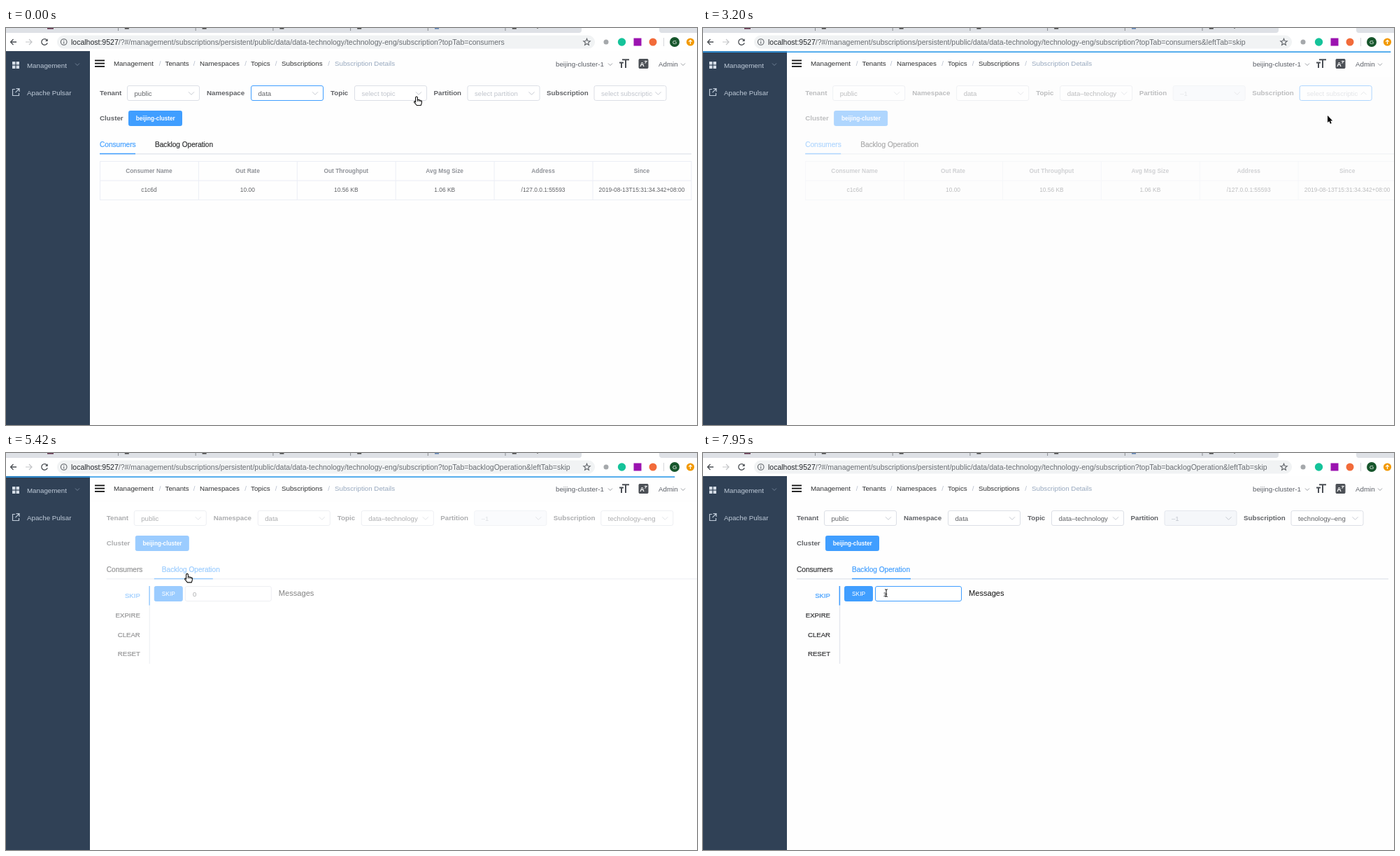
An HTML page with a canvas that plays this animation: 988 by 567 pixels, repeating every 8 s.

```html
<!DOCTYPE html>
<html lang="en">
<head>
<meta charset="utf-8">
<title>Subscription details</title>
<style>
html, body { margin: 0; width: 100%; height: 100%; overflow: hidden; background: #fefefe; }
canvas { display: block; }
</style>
</head>
<body>
<canvas id="stage" width="988" height="567"></canvas>
<script>
const c = document.getElementById('stage').getContext('2d');
const LOOP = 8000;
const FONT = '"Liberation Sans", Arial, sans-serif';
const BLUE = '#409eff', BG = '#fefefe', LINE = '#ebeef5', EDGE = '#dcdfe6';
const TEXT = '#606266', PALE = '#c0c4cc', DARK = '#303133', GREY = '#909399';

// The screen is refreshed only at these moments.
const TICKS = [0, 200, 500, 650, 800, 930, 1080, 1380, 1530, 1680, 1830, 1980,
  2270, 2420, 2570, 2720, 3020, 3200, 3350, 3530, 3730, 3880,
  4080, 4230, 4380, 4530, 4670, 4820, 5270, 5420, 5570, 5770, 5920, 6150, 6300,
  6450, 6600, 7050, 7200, 7650, 7950];

// time, x, y, shape from this time on
const POINTER = [
  [0, 587, 98, 'hand'], [500, 587, 98, 'hand'], [1080, 560, 125, 'hand'],
  [1380, 562, 126, 'hand'], [1500, 620, 122, 'arrow'], [1830, 885, 97, 'hand'],
  [1980, 902, 95, 'hand'], [2270, 902, 95, 'hand'], [2720, 893, 125, 'hand'],
  [3100, 893, 125, 'arrow'], [3400, 893, 125, 'arrow'], [4080, 560, 175, 'arrow'],
  [4700, 275, 172, 'hand'], [4820, 259, 172, 'hand'], [5270, 259, 172, 'hand'],
  [5920, 259, 173.5, 'hand'], [6150, 259, 174, 'hand'], [6300, 266, 200, 'beam'],
  [6450, 252, 201, 'beam'], [6600, 266, 200, 'beam'], [7200, 268, 200, 'beam'],
  [7940, 268, 200, 'beam'], [7950, 262, 200, 'beam']];

const clamp = x => Math.max(0, Math.min(1, x));
const mix = (a, b, k) => a + (b - a) * k;
const between = (t, a, b) => t >= a && t < b;
const easeOut = x => 1 - (1 - clamp(x)) ** 4;

// CSS "ease": cubic-bezier(.25, .1, .25, 1)
function ease(x) {
  x = clamp(x);
  let lo = 0, hi = 1, s;
  for (let i = 0; i < 20; i++) {
    s = (lo + hi) / 2;
    if (.75 * s * (1 - s) + s ** 3 < x) lo = s; else hi = s;
  }
  return .3 * s * (1 - s) ** 2 + 3 * s * s * (1 - s) + s ** 3;
}

function rect(x, y, w, h, fill) {
  c.fillStyle = fill;
  c.fillRect(x, y, w, h);
}

function box(x, y, w, h, fill, edge, r = 2.5) {
  c.beginPath();
  c.roundRect(x + .5, y + .5, w - 1, h - 1, r);
  c.fillStyle = fill;
  c.fill();
  c.strokeStyle = edge;
  c.lineWidth = 1;
  c.stroke();
}

function disc(x, y, r, fill) {
  c.beginPath();
  c.arc(x, y, r, 0, 7);
  c.fillStyle = fill;
  c.fill();
}

function path(d, stroke, width = 1, fill) {
  const p = new Path2D(d);
  if (fill) { c.fillStyle = fill; c.fill(p); }
  if (stroke) { c.strokeStyle = stroke; c.lineWidth = width; c.stroke(p); }
}

// y is the middle of the line; weight 500 is thickened slightly
function text(s, x, y, color, size = 9.75, weight = 400, align = 'left') {
  c.font = `${weight > 500 ? 'bold ' : ''}${size}px ${FONT}`;
  c.textAlign = align;
  c.fillStyle = color;
  c.fillText(s, x, y + size * .35);
  if (weight === 500) {
    c.strokeStyle = color;
    c.lineWidth = .2;
    c.strokeText(s, x, y + size * .35);
  }
}

function chevron(x, y, color, turn = 0, r = 4) {
  c.save();
  c.translate(x, y);
  c.rotate(-Math.PI * turn);
  path(`M${-r} ${-r / 2}L0 ${r / 2}L${r} ${-r / 2}`, color, .9);
  c.restore();
}

function browser(t) {
  rect(0, 0, 988, 33, '#fff');
  c.fillStyle = '#dee1e6';
  c.beginPath();
  c.roundRect(-5, -5, 828, 12, [0, 0, 4, 0]);
  c.roundRect(934, -5, 60, 12, [0, 0, 0, 4]);
  c.fill();
  for (let i = 0; i < 6; i++) rect(160 + i * 110.7, 0, 1, 4, '#8a8d91');
  for (let i = 0; i < 7; i++)
    rect(59 + i * 110.8, 0, i ? 6 : 9, 1.5, i === 5 ? '#5b7fb0' : i ? '#444' : '#5a2a44');
  rect(759, 0, 2, 1, '#888');

  path('M15 20H6.5M10.5 16L6.5 20L10.5 24', '#4b4f54', 1.3);
  path('M28 20H37M33 16L37 20L33 24', '#c3c5c8', 1.2);
  path('M58.6 17.4A4.3 4.3 0 1 0 59.2 21.3', '#4b4f54', 1.3);
  path('M59.7 15.3V19H56Z', null, 0, '#4b4f54');

  box(73, 10.5, 769, 19, '#f1f3f4', '#f1f3f4', 9);
  path('M87 20A4.3 4.3 0 1 1 78.4 20A4.3 4.3 0 1 1 87 20M82.7 19.5V22.5M82.7 17.4V18.5', '#5f6368', 1.1);
  const host = 'localhost:9527';
  text(host, 93, 20, '#24272b', 10.5);
  const tab = t < 5270 ? 'consumers' : 'backlogOperation';
  text('/?#/management/subscriptions/persistent/public/data/data-technology/technology-eng/subscription?topTab='
    + tab + (t < 3020 ? '' : '&leftTab=skip'), 93 + c.measureText(host).width, 20, '#6a6e73', 10.52);

  let star = '';
  for (let i = 0; i < 10; i++) {
    const a = i * Math.PI / 5, r = i % 2 ? 2.2 : 5;
    star += `${i ? 'L' : 'M'}${830.5 + r * Math.sin(a)} ${20.3 - r * Math.cos(a)}`;
  }
  path(star + 'Z', '#5f6368', 1.1);
  disc(858, 20, 3.5, '#a5a8ab');
  disc(880.5, 20, 5.7, '#15c39a');
  rect(897.5, 14.5, 11, 11, '#9b13b0');
  disc(925, 20, 5.5, '#f26b3a');
  rect(940, 14, 1, 12, '#d5d7da');
  disc(956, 20, 7, '#17562c');
  text('G', 956, 20, '#fff', 8, 400, 'center');
  disc(978.5, 20, 5.6, '#f29900');
  path('M978.5 23V17.5M976.2 19.7L978.5 17.4L980.8 19.7', '#fff', 1.2);
}

function sidebar() {
  rect(0, 33, 120, 534, '#304156');
  for (const [x, y] of [[9, 48], [14.6, 48], [9, 53.6], [14.6, 53.6]]) rect(x, y, 4.4, 4.4, '#d5dde7');
  text('Management', 30, 53.5, '#bfcbd9');
  chevron(102, 52, '#77879b', 0, 3);
  path('M13 87.5H9.5V96.5H18.5V93M14.5 86.7H19V91M19 86.7L13.5 92.2', '#bfcbd9', 1.2);
  text('Apache Pulsar', 30, 92.3, '#bfcbd9');
}

function navbar() {
  rect(120, 33, 868, 36, BG);
  for (const y of [45.5, 49.7, 54]) rect(127, y, 14, 1.8, '#111');
  const crumbs = [['Management', 154], ['Tenants', 227.5], ['Namespaces', 277], ['Topics', 350], ['Subscriptions', 394]];
  const slash = [220, 269, 342.5, 386, 461.5];
  crumbs.forEach(([s, x], i) => {
    text(s, x, 51, DARK);
    text('/', slash[i], 51, '#b4bccc', 9.75, 400, 'center');
  });
  text('Subscription Details', 470, 51, '#97a8be');
  text('beijing-cluster-1', 786, 51.5, '#5a5e66');
  chevron(864, 52, GREY, 0, 3);
  path('M881 45.2H891M886 45.2V57M877 49.5H883M880 49.5V57', '#4c5056', 2);
  box(904.5, 44, 14, 14, '#4c5056', '#4c5056', 1);
  text('A', 909.6, 51.5, '#fff', 9, 700, 'center');
  path('M912.5 47.5H917M912.8 50.5L916.6 47.5M914.7 46.5V50.5', '#fff', .7);
  text('Admin', 933, 51.5, '#5a5e66');
  chevron(968, 52, GREY, 0, 3);
}

function select(label, lx, x, value, o = {}) {
  text(label, lx, 93, TEXT, 9.75, 700);
  box(x, 82, 104, 22, o.off ? '#f5f7fa' : '#fff', o.edge || (o.off ? '#e4e7ed' : EDGE));
  c.save();
  c.beginPath();
  c.rect(x, 82, 83, 22);
  c.clip();
  text(value, x + 10.5, 93.2, o.hint || o.off ? PALE : TEXT, 9.6);
  c.restore();
  chevron(x + 92, 93.3, PALE, o.turn || 0);
}

const turned = (t, a, b) => ease((t - a) / 300) - ease((t - b) / 300);

function filters(t) {
  const picked = t >= 1380, done = t >= 3600;
  select('Tenant', 134, 173, 'public');
  select('Namespace', 287, 350, 'data', { edge: t < 500 && BLUE });
  select('Topic', 464, 498, picked ? 'data–technology' : 'select topic', {
    hint: !picked, turn: turned(t, 450, 1370),
    edge: between(t, 500, 2400) ? BLUE : between(t, 200, 500) && PALE
  });
  select('Partition', 611.5, 659.5, picked ? '–1' : 'select partition', { hint: !picked, off: picked });
  select('Subscription', 773, 840.5, done ? 'technology–eng' : 'select subscription', {
    hint: !done, turn: turned(t, 2215, 3600),
    edge: between(t, 2400, 3600) ? BLUE : between(t, 1830, 2400) && PALE
  });
}

function tabs(t, y) {
  const backlog = t >= 5270;
  text('Consumers', 134, y, backlog ? DARK : BLUE, 10.1, 500);
  text('Backlog Operation', 213, y, t >= 4800 ? BLUE : DARK, 10.1, 500);
  rect(134, y + 12.3, 846, 1.4, '#e4e7ed');
  const k = ease((t - (t < 5700 ? 5250 : 5728)) / 300);
  rect(mix(134, 213, k), y + 12, backlog ? 84 : 51, 1.5, BLUE);
}

function table(y, empty) {
  const heads = ['Consumer Name', 'Out Rate', 'Out Throughput', 'Avg Msg Size', 'Address', 'Since'];
  const row = ['c1c6d', '10.00', '10.56 KB', '1.06 KB', '/127.0.0.1:55593', '2019-08-13T15:31:34.342+08:00'];
  const w = 140.9, h = empty ? 70 : 56;
  for (const ly of [0, 27.5, h - 1]) rect(134, y + ly, 846, 1, LINE);
  for (let i = 0; i < 7; i++) rect(134 + i * w, y, 1, empty && i % 6 ? 28 : h, LINE);
  heads.forEach((s, i) => {
    const x = 134 + (i + .5) * w;
    text(s, x, y + 14.3, GREY, 8.4, 700, 'center');
    if (!empty) text(row[i], x, y + 41.3, TEXT, 8.4, 400, 'center');
  });
  if (empty) text('No Data', 557, y + 48.7, GREY, 8.4, 400, 'center');
}

function backlog(t) {
  ['SKIP', 'EXPIRE', 'CLEAR', 'RESET'].forEach((s, i) =>
    text(s, 182, 203.7 + i * 27.8, i ? DARK : BLUE, 9.6, 500, 'right'));
  rect(194.8, 190, 1.4, 111, '#e4e7ed');
  rect(194.6, 190, 1.5, 27.5, BLUE);
  box(202, 190, 41, 22, BLUE, BLUE, 2);
  text('SKIP', 222.5, 201, '#fff', 8.4, 400, 'center');
  box(246, 190, 124, 22, '#fff', t >= 7200 ? BLUE : t >= 7050 ? '#7fb2e6' : t >= 6300 ? PALE : EDGE);
  text(t < 7650 ? '0' : '1', 257.3, 201.2, TEXT, 9.6);
  if (between(t, 7050, 7650)) rect(262.6, 195, .8, 12, '#222');
  text('Messages', 380, 200.3, '#111', 11.1);
}

function page(t) {
  let shift = 0, fade = 0;
  for (const [out, into] of [[3030, 3740], [5280, 5840]]) {
    if (between(t, out, into)) {
      fade = ease((t - out) / 500);
      shift = 20.7 * fade;
    } else if (between(t, into, into + 500)) {
      fade = 1 - ease((t - into) / 500);
      shift = -20.7 * fade;
    }
  }
  const empty = between(t, 3600, 4200), up = empty ? 35 : 0;
  c.save();
  c.translate(shift, 0);
  filters(t);
  if (!empty) {
    text('Cluster', 134, 128.5, TEXT, 9.75, 700);
    box(175, 118, 77, 22, BLUE, BLUE, 2);
    text('beijing-cluster', 213.7, 129, '#fff', 8.2, 700, 'center');
  }
  tabs(t, 166.8 - up);
  if (t < 5270) table(190 - up, empty);
  else backlog(t);
  c.restore();
  c.globalAlpha = fade;
  rect(120, 70, 868, 497, BG);
  c.globalAlpha = 1;
}

function dropdown(t, open, close, x, w, items) {
  const k = t < close ? easeOut((t - open) / 300) : 1 - easeOut((t - close) / 300);
  if (k < .05) return;
  c.save();
  c.globalAlpha = k;
  c.translate(0, 113);
  c.scale(1, k);
  c.shadowColor = 'rgba(0,0,0,.1)';
  c.shadowBlur = 8;
  c.shadowOffsetY = 1.4;
  box(x, 0, w, items.length * 23.6 + 9, '#fff', '#e4e7ed');
  c.shadowColor = 'transparent';
  path(`M${x + 24} .6L${x + 28} -4L${x + 32} .6`, '#e4e7ed', 1, '#fff');
  if (t >= open + 350) rect(x + 1, 4.5, w - 2, 23.6, '#f5f7fa');
  items.forEach((s, i) => text(s, x + 10.5, 16.5 + i * 23.6, TEXT, 9.7));
  c.restore();
}

function progress(t) {
  const start = t < 5000 ? 3000 : 5250;
  const k = ease((t - start) / 220);
  c.globalAlpha = 1 - clamp((t - start - 250) / 200);
  if (k > 0 && c.globalAlpha > 0) rect(0, 33.4, 988 * k, 1.6, '#2f9bea');
  c.globalAlpha = 1;
}

const SHAPES = {
  hand() {
    path('M-1.4 1Q0 -.9 1.4 1V4.8Q2.6 3.8 3.7 5.2Q5 4.4 5.8 5.9Q7.4 5.3 7.5 7L7.2 9.7L6.2 12.5H.4L-3.4 8Q-3.7 6.2 -2 6.8L-1.4 7.6Z',
      '#111', 1.1, '#fff');
    path('M1.4 5V7.2M3.7 5.4V7.3M5.8 6V7.6', '#111', .8);
  },
  arrow() {
    path('M0 0V10L2.3 8L3.9 11.8L5.7 11L4.1 7.4H7.2Z', '#fff', 1.4, '#000');
    path('M0 0V10L2.3 8L3.9 11.8L5.7 11L4.1 7.4H7.2Z', null, 0, '#000');
  },
  beam() {
    path('M-2 -5.2Q0 -5.2 0 -4Q0 -5.2 2 -5.2M0 -4V4M-2 5.2Q0 5.2 0 4Q0 5.2 2 5.2M-1.2 1.5H1.2', '#222', 1.1);
  }
};

function pointer(t) {
  let i = POINTER.length - 1;
  while (POINTER[i][0] > t) i--;
  const a = POINTER[i], b = POINTER[i + 1] || a;
  const k = b === a ? 0 : (t - a[0]) / (b[0] - a[0]);
  c.save();
  c.translate(mix(a[1], b[1], k), mix(a[2], b[2], k));
  SHAPES[a[3]]();
  c.restore();
}

function draw(t) {
  rect(0, 0, 988, 567, BG);
  page(t);
  navbar();
  sidebar();
  browser(t);
  progress(t);
  dropdown(t, 450, 1370, 498, 118, ['data-technology', 'data-technology-test', 'data-technology-stage']);
  dropdown(t, 2230, 3010, 840.5, 104, ['technology-eng']);
  pointer(t);
}

function frame() {
  const now = performance.now() % LOOP;
  draw(TICKS.findLast(tick => tick <= now));
  requestAnimationFrame(frame);
}
frame();
</script>
</body>
</html>
```
